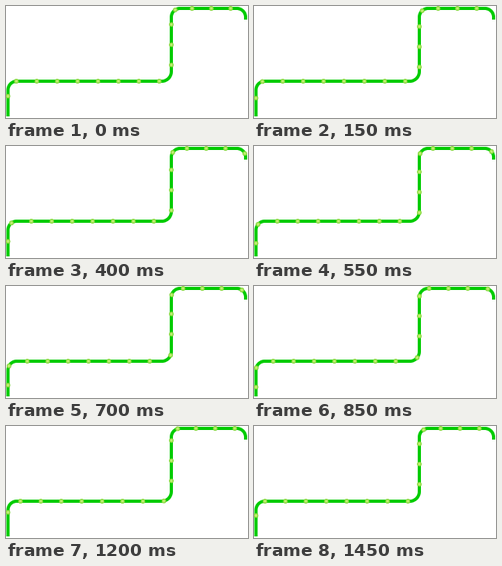
Write an HTML page with a canvas that moves like this. It is 303 by 140 pixels and loops after 1.5 s.

```html
<!DOCTYPE html>
<html>
<head>
<meta charset="utf-8">
<style>
html, body { margin: 0; width: 100%; height: 100%; overflow: hidden; background: #fff; }
canvas { display: block; }
</style>
</head>
<body>
<canvas id="stage" width="303" height="140"></canvas>
<script>
const ctx = document.getElementById('stage').getContext('2d');
const LOOP = 1500, STEP = 50, Q = Math.PI / 2;

// Each piece spans [from, to] in loops along the route, top right to bottom left.
const line = (from, to, x1, y1, x2, y2) => ({
  from, to, at: k => [x1 + (x2 - x1) * k, y1 + (y2 - y1) * k]
});
const bend = (from, to, cx, cy, r, a, turn) => ({
  from, to, at: k => [cx + r * Math.cos(a + turn * k), cy + r * Math.sin(a + turn * k)]
});

const route = [
  line(-1.1, -0.9, 300, 17, 300, 14),
  bend(-0.9, -0.3, 289, 14, 11, 0, -Q),
  line(-0.3, 0, 289, 3, 281.3, 3),
  line(0, 2.62, 281.3, 3, 218, 3),
  bend(2.62, 3.64, 218, 14, 11, -Q, -Q),
  line(3.64, 6.33, 207, 14, 207, 82),
  bend(6.33, 6.88, 195, 82, 12, 0, Q),
  line(6.88, 13.98, 195, 94, 13.5, 94),
  bend(13.98, 14.68, 13.5, 105, 11, -Q, -Q),
  line(14.68, 16.05, 2.5, 105, 2.5, 138)
];

const FIRST = -0.74, LAST = 15.75;

function pointAt(u) {
  const p = route.find(s => u <= s.to);
  return p.at((u - p.from) / (p.to - p.from));
}

function drawLine() {
  ctx.beginPath();
  for (const s of route)
    for (let i = 0; i <= 16; i++) ctx.lineTo(...s.at(i / 16));
  ctx.strokeStyle = '#00cc00';
  ctx.lineWidth = 4;
  ctx.stroke();
}

function drawDot(x, y) {
  const shade = ctx.createRadialGradient(x, y, 0, x, y, 3);
  shade.addColorStop(0, '#d2f596');
  shade.addColorStop(0.5, '#a8e858');
  shade.addColorStop(1, '#74d02c');
  ctx.fillStyle = shade;
  ctx.beginPath();
  ctx.arc(x, y, 2.9, 0, 2 * Math.PI);
  ctx.fill();
}

function frame() {
  const time = Math.floor(performance.now() % LOOP / STEP) * STEP;
  ctx.clearRect(0, 0, 303, 140);
  drawLine();
  for (let u = time / LOOP - 1; u < LAST; u++)
    if (u >= FIRST) drawDot(...pointAt(u));
  requestAnimationFrame(frame);
}
frame();
</script>
</body>
</html>
```
